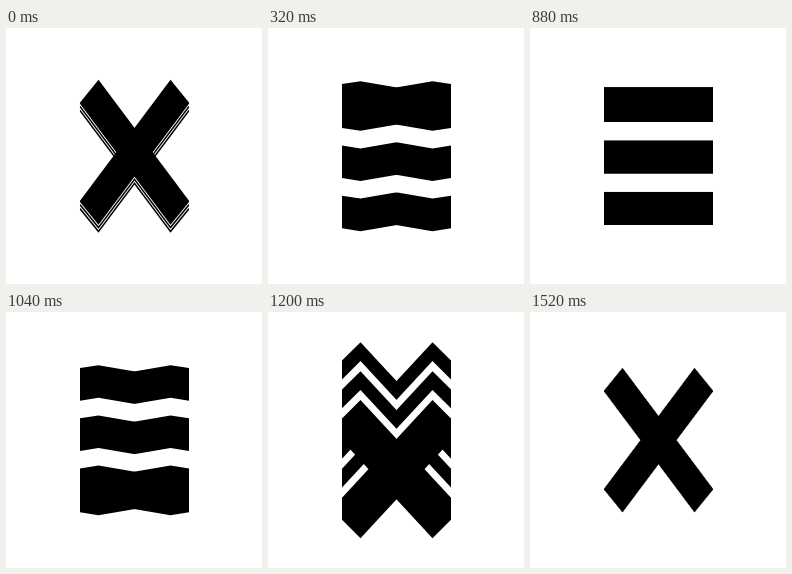
Write an HTML page with a canvas that moves like this. It is 256x256 px and loops after 1.92 s.

```html
<!DOCTYPE html>
<html lang="en">
<head>
<meta charset="utf-8">
<title>Menu icon</title>
<style>
  html, body { margin: 0; height: 100%; overflow: hidden; background: #fff; }
  canvas { display: block; width: 100vw; height: 100vh; }
</style>
</head>
<body>
<canvas id="stage" width="256" height="256"></canvas>
<script>
const ctx = document.getElementById("stage").getContext("2d");
const LOOP = 1920, STEP = 80;
const CX = 128.5, CY = 128.2, HALF = 54.5, TIP = 36;

const ease = x => (1 - Math.cos(Math.PI * Math.min(1, Math.max(0, x)))) / 2;
const mix = (a, b, k) => a + (b - a) * k;

// Position on the way from cross to bars; closing runs it backwards
const openTime = t => t < 880 ? Math.min(t, 480) : 1360 - t;

// Heights are half heights at the box edge, the tip and the centre
function poseAt(time) {
  const spread = ease((time + 80) / 445);
  const flat = ease((time - 90) / 320);
  const slope = Math.tan(mix(53.2, 0, flat) * Math.PI / 180);
  const swell = 7.2 * Math.sin(Math.PI * spread) ** 2;
  const mid = mix(24, 17.4, flat) + swell;
  const tip = mid + TIP * slope;
  const edge = tip - 17 * slope;
  const inner = Math.max(-edge, mid - HALF * slope);
  return { spacing: 51.5 * spread, mid, tip, edge, inner };
}

// One arm leaning by side (1 or -1), cut off at the box edges
function arm(y, side, { edge, tip, inner }) {
  const points = [[-HALF, -edge], [-TIP, -tip], [HALF, -inner],
                  [HALF, edge], [TIP, tip], [-HALF, inner]];
  ctx.beginPath();
  for (const [px, py] of points) ctx.lineTo(CX + side * px, y + py);
  ctx.fill();
}

function cross(y, color, pose) {
  ctx.fillStyle = color;
  arm(y, 1, pose);
  arm(y, -1, pose);
}

function draw(now) {
  const t = Math.floor(now / STEP) * STEP;
  const pose = poseAt(openTime(t));
  const shift = pose.spacing * (t > 880 ? -1 : 1); // closing stacks the other way up
  ctx.fillStyle = "#fff";
  ctx.fillRect(0, 0, 256, 256);
  for (let i = 1; i >= -1; i--) {
    const y = CY + i * shift;
    if (i < 1) cross(y + shift * 0.35, "#fff", pose);
    cross(y, "#000", pose);
  }
}

function frame() {
  draw(performance.now() % LOOP);
  requestAnimationFrame(frame);
}
frame();
</script>
</body>
</html>
```
